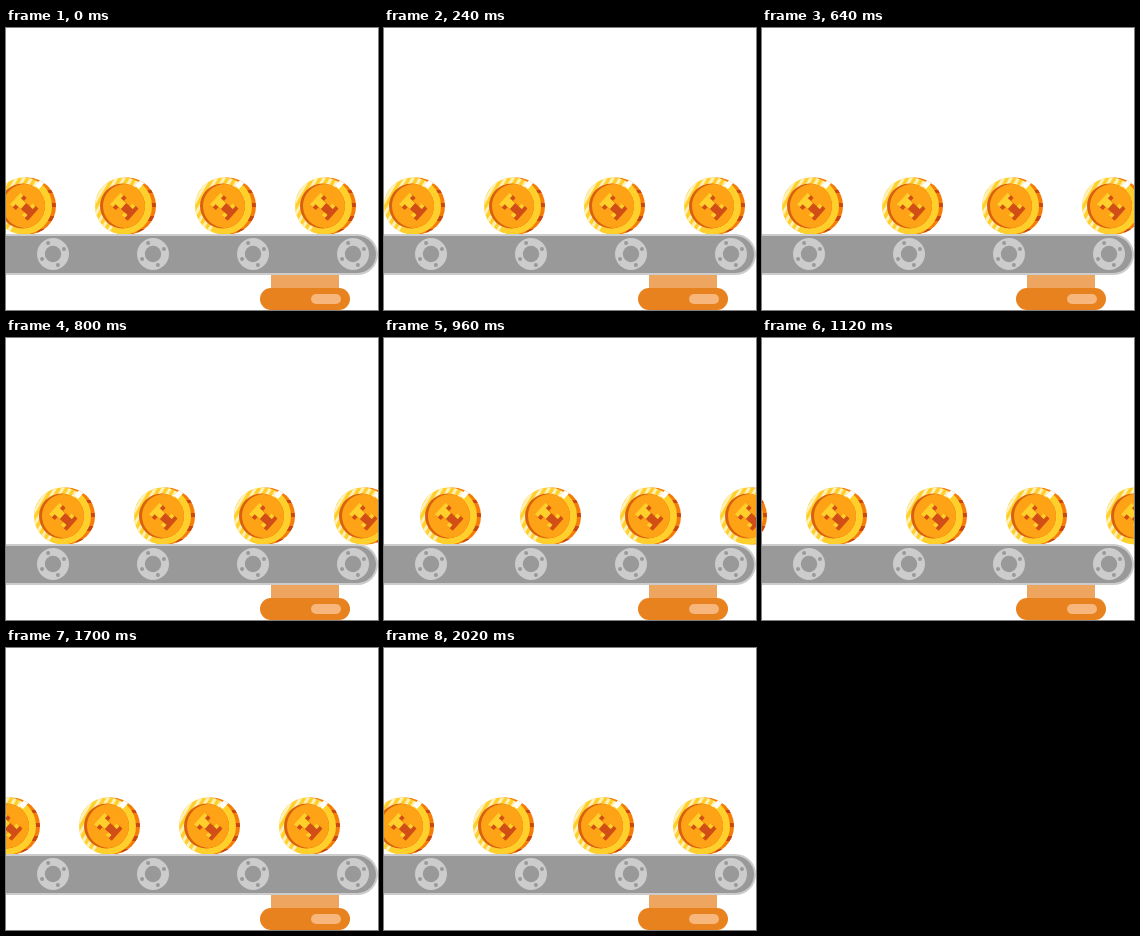
An HTML page with a canvas that plays this animation: 372x282 px, repeating every 2.04 s.

```html
<!DOCTYPE html>
<html lang="en">
<head>
<meta charset="utf-8">
<title>Coin conveyor</title>
<style>
html, body { margin: 0; width: 100%; height: 100%; overflow: hidden; background: #fff; }
canvas { display: block; }
</style>
</head>
<body>
<canvas id="stage" width="372" height="282"></canvas>
<script>
const ctx = document.getElementById('stage').getContext('2d');
const LOOP = 2040, STEP = 20, GAP = 100, PAUSE = 12;
const R = 28.5, RED = '#d14f16', GOLD = '#ffd02b', CREAM = '#fff0b8';

function disc(x, y, r, color) {
  ctx.fillStyle = color;
  ctx.beginPath();
  ctx.arc(x, y, r, 0, Math.PI * 2);
  ctx.fill();
}

function pill(x, y, w, h, r, color) {
  ctx.fillStyle = color;
  ctx.beginPath();
  ctx.roundRect(x, y, w, h, r);
  ctx.fill();
}

function clipped(x, r, draw) {
  ctx.save();
  ctx.beginPath();
  ctx.arc(x, 0, r, 0, Math.PI * 2);
  ctx.clip();
  draw();
  ctx.restore();
}

function turned(deg, draw) {
  ctx.save();
  ctx.rotate(deg * Math.PI / 180);
  draw();
  ctx.restore();
}

// two crossbars joined by a stem
function beam(shift, color) {
  ctx.fillStyle = color;
  for (const side of [-1, 1]) ctx.fillRect(side * 8 - 2 + shift, -8, 4, 16);
  ctx.fillRect(-8 + shift, -4, 16, 8);
}

function emblem() {
  turned(42, () => {
    for (let d = 4; d > 0; d--) beam(d - 1, RED);
    beam(-1, GOLD);
    ctx.fillStyle = RED;
    ctx.fillRect(0, -4, 11, 8);
  });
}

function edge() {
  disc(4, 0, R, '#f57c08');
  clipped(4, R, () => {
    ctx.fillStyle = '#c94710';
    for (let i = 0; i < 4; i++) ctx.fillRect(14, 13 * i - 16, 22, 3 + i);
  });
}

function face() {
  disc(0, 0, R, GOLD);
  clipped(0, R, () => turned(30, () => {
    ctx.fillStyle = CREAM;
    for (let i = 0; i < 5; i++) ctx.fillRect(6.5 * i - 28, -R, 3, 2 * R);
  }));
  disc(-1, 0, 22.5, '#d9600f');
  clipped(-1, 22.5, () => disc(1.5, 0, 22, '#ffa316'));
}

function glint() {
  clipped(4, R, () => turned(42, () => {
    ctx.fillStyle = '#fff';
    ctx.fillRect(-5, -36, 5, 13);
  }));
}

function coin(x) {
  ctx.save();
  ctx.translate(x, 178);
  edge();
  face();
  glint();
  emblem();
  ctx.restore();
}

function roller(x) {
  disc(x, 226, 16, '#ccc');
  disc(x, 226, 8.2, '#999');
  for (let i = 0; i < 4; i++) {
    const a = i * Math.PI / 2 - 0.42;
    disc(x + 12 * Math.cos(a), 226 + 12 * Math.sin(a), 2, '#999');
  }
}

function machine() {
  ctx.fillStyle = '#eda560';
  ctx.fillRect(265, 246, 68, 15);
  pill(254, 260, 90, 22, 11, '#e8821e');
  pill(305, 266, 30, 10, 5, '#f6b67c');
  pill(-40, 206, 412, 41, 20.5, '#ccc');
  pill(-40, 208, 410, 37, 18.5, '#999');
  for (let i = 0; i < 4; i++) roller(47 + i * GAP);
}

function draw(now) {
  const k = Math.floor((now % LOOP) / STEP);
  const shift = k < PAUSE ? k : k - 1;
  ctx.fillStyle = '#fff';
  ctx.fillRect(0, 0, 372, 282);
  for (let i = -1; i < 4; i++) coin(17.5 + i * GAP + shift);
  machine();
}

const start = performance.now();
function tick() {
  draw(performance.now() - start);
  requestAnimationFrame(tick);
}
tick();
</script>
</body>
</html>
```
